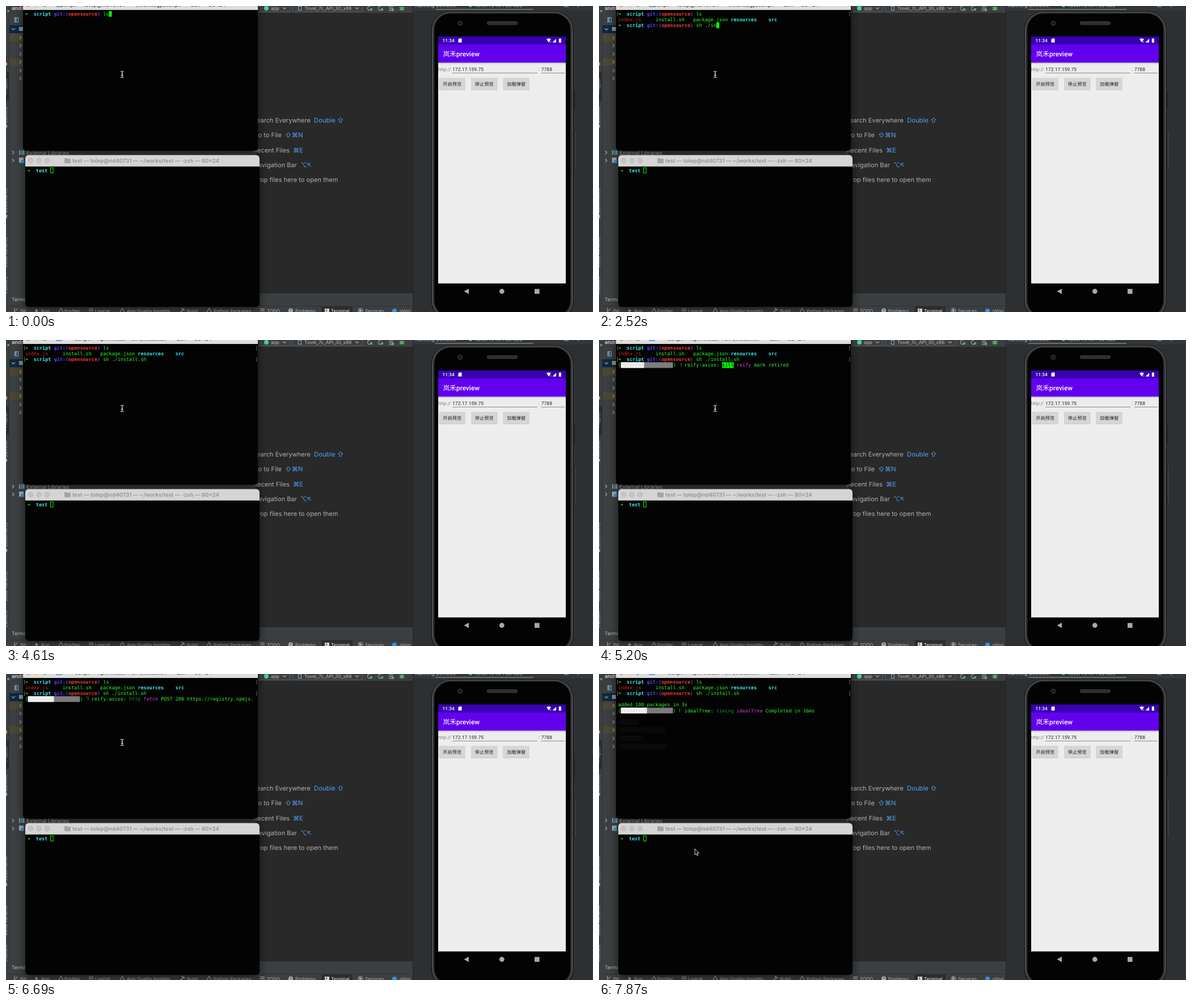
An HTML page with a canvas for the animation above (8000 ms loop, 1035 by 541 pixels).

```html
<!DOCTYPE html>
<html lang="en">
<head>
<meta charset="utf-8">
<title>Terminal install</title>
<style>
html, body { margin: 0; width: 100%; height: 100%; overflow: hidden; background: #2b2b2b; }
canvas { display: block; width: 1035px; height: 541px; }
</style>
</head>
<body>
<canvas id="stage" width="1035" height="541"></canvas>
<script>
const c = document.getElementById('stage').getContext('2d');
const LOOP = 8000;
const UI = 'Inter, "DejaVu Sans", sans-serif';
const PHONE = 'Roboto, "Noto Sans CJK SC", "Noto Sans CJK", sans-serif';
const MONO = '"DejaVu Sans Mono", monospace';
const CELL = 5.1, ROW = 10.1;
const GREEN = '#2cff22', LIME = '#00ff00', CYAN = '#3deaea', RED = '#f83a2e';
const BLUE = '#5a3cf5', MAGENTA = '#d040dc', DARK_GREEN = '#0c9a1a', SCREEN = '#030303';

// ---------- drawing helpers ----------
function box(x, y, w, h, color) {
  c.fillStyle = color;
  c.fillRect(x, y, w, h);
}
function round(x, y, w, h, r, color) {
  c.fillStyle = color;
  c.beginPath();
  c.roundRect(x, y, w, h, r);
  c.fill();
}
function dot(x, y, r, color) {
  c.fillStyle = color;
  c.beginPath();
  c.arc(x, y, r, 0, Math.PI * 2);
  c.fill();
}
function path(points, color, width = 1) {
  c.beginPath();
  points.forEach(([x, y]) => c.lineTo(x, y));
  c.strokeStyle = color;
  c.lineWidth = width;
  c.stroke();
}
function poly(points, color) {
  c.beginPath();
  points.forEach(([x, y]) => c.lineTo(x, y));
  c.closePath();
  c.fillStyle = color;
  c.fill();
}
function frame(x, y, w, h, color) {
  c.strokeStyle = color;
  c.lineWidth = 1;
  c.strokeRect(x, y, w, h);
}
function text(s, x, y, size, color, { font = UI, weight = 400, align = 'left' } = {}) {
  c.font = `${weight} ${size}px ${font}`;
  c.textAlign = align;
  c.fillStyle = color;
  c.fillText(s, x, y);
}
function chevron(x, y, down) {
  const p = down ? [[x - 3, y - 1.5], [x, y + 1.5], [x + 3, y - 1.5]]
                 : [[x - 1.5, y - 3], [x + 1.5, y], [x - 1.5, y + 3]];
  path(p, '#a5a8aa', 1.1);
}
// The last entry whose time has come.
const at = (list, t) => list.reduce((found, item) => item[0] <= t ? item : found, list[0]);

// ---------- IDE ----------
function sidebar() {
  box(0, 0, 447, 541, '#3c3f41');
  box(5, 0, 1, 530, '#323435');
  box(0, 117, 5, 51, '#2a2c2d');
  dot(4, 9, 2, '#59a869');
  text('andr', 10, 7, 9.2, '#c8cacb', { weight: 700 });
  frame(15.5, 20.5, 6, 8, '#9aa7b0');
  box(16, 21, 3, 8, '#3d8fc2');
  box(6, 34, 30, 14, '#0d293e');
  box(6, 49, 30, 14, '#4b4635');
  box(6, 92, 30, 14, '#4b4635');
  chevron(13, 41, true);
  box(23, 37, 9, 7, '#8f9aa3');
  [56, 70, 85, 99, 114, 128].forEach(y => chevron(25.5, y));
  chevron(12.5, 259);
  [23, 26, 29, 31].forEach((x, i) => box(x, 255, 1.6, 8, i % 2 ? '#4aa3c8' : '#9aa7b0'));
  text('External Libraries', 36, 262.5, 9.2, '#c4c7c9');
  chevron(12.5, 273);
  box(23, 268, 8, 9, '#9aa7b0');
  dot(29, 275, 3, '#3592c4');
  [['Project', 155], ['Commit', 208], ['Bookmarks', 366], ['Build Variants', 462], ['Structure', 514]]
    .forEach(([label, y]) => {
      c.save();
      c.translate(2, y);
      c.rotate(-Math.PI / 2);
      text(label, 0, 0, 8.2, '#b4b7b9');
      c.restore();
    });
  box(0, 100, 2, 5, '#9aa7b0');
  box(0, 210, 2, 5, '#9aa7b0');
  box(0, 369, 2, 6, '#9aa7b0');
}

function editor() {
  box(440, 0, 278, 12, '#3c3f41');
  box(440, 12, 278, 496, '#292929');
  frame(449.5, -8, 51, 18, '#5a5d5f');
  frame(505.5, -8, 123, 18, '#5a5d5f');
  dot(459, 4, 4, '#3ddc84');
  text('app', 467, 7, 8.4, '#bbbdbf');
  chevron(491, 4, true);
  frame(515.5, 0.5, 5, 7, '#9aa7b0');
  text('Tovel_7c_API_30_x86', 526, 7, 8.4, '#bbbdbf');
  chevron(619, 4, true);
  [641, 660].forEach(x => {
    c.beginPath();
    c.arc(x, 4, 3.5, 0.6, 5);
    c.strokeStyle = '#9aa7b0';
    c.lineWidth = 1.2;
    c.stroke();
    box(x + 1, 4, 4, 4, '#59a869');
  });
  [1, 4, 7].forEach(y => box(675, y, 8, 1.2, '#9aa7b0'));
  box(680, 5, 4, 4, '#59a869');
  dot(698, 4.5, 3.5, '#59a869');
  path([[693, 2], [703, 7]], '#59a869');
  path([[693, 7], [703, 2]], '#59a869');

  [['Search Everywhere', 537, 'Double ⇧', 543], ['Go to File', 486, '⇧⌘N', 492],
   ['Recent Files', 500, '⌘E', 506], ['Navigation Bar', 513, '⌥↖', 519],
   ['Drop files here to open them', 585.5, '', 0]]
    .forEach(([label, right, keys, x], i) => {
      const y = 206.3 + i * 26.15;
      text(label, right, y, 11.1, '#afb0b1', { align: 'right' });
      text(keys, x, y, 11.3, '#559ef5');
    });
}

function bottomBar() {
  box(0, 508, 718, 22, '#3c3f41');
  box(0, 530, 718, 1, '#2f3132');
  box(0, 531, 718, 10, '#3c3f41');
  text('Terminal', 10, 522, 8.8, '#b9bbbd');
  box(556, 531, 55, 10, '#2b2d2e');
  [['Git', 25, 17], ['Run', 62, 54], ['Profiler', 103, 97], ['Logcat', 157, 150],
   ['App Quality Insights', 213, 205], ['Build', 319, 311], ['Python Packages', 366, 358],
   ['TODO', 460, 452], ['Problems', 510, 502], ['Terminal', 573, 566], ['Services', 633, 625]]
    .forEach(([label, x, icon]) => {
      text(label, x, 541.5, 8.1, label === 'Terminal' ? '#f0f0f0' : '#b4b7b9');
      drawTabIcon(label, icon);
    });
  dot(685, 539, 4, '#3d8bf0');
  text('nVoo', 694, 541.5, 8.1, '#b4b7b9');
  box(717, 0, 1.5, 541, '#232425');
}
function drawTabIcon(label, x) {
  const gray = '#a4abb0';
  if (label === 'Problems') {
    dot(x, 538.5, 4, gray);
    box(x - 0.5, 536, 1.2, 3, '#3c3f41');
  } else if (label === 'Run' || label === 'Services') {
    if (label === 'Services') { c.beginPath(); c.arc(x, 538.5, 4, 0, 7); c.strokeStyle = gray; c.stroke(); }
    poly([[x - 2, 535], [x + 3, 538.5], [x - 2, 542]], gray);
  } else if (label === 'Logcat' || label === 'TODO') {
    [535, 538].forEach(y => box(x - 4, y, 8, 1.2, gray));
  } else if (label === 'Terminal') {
    box(x - 4, 535, 8, 6, '#d0d2d3');
    path([[x - 2, 536], [x, 538], [x - 2, 540]], '#2b2d2e');
  } else if (label === 'Git') {
    path([[x - 2, 534], [x - 2, 541]], gray);
    path([[x - 2, 540], [x + 2, 537], [x + 2, 535]], gray);
  } else if (label === 'Build') {
    path([[x - 3, 541], [x + 2, 536]], gray, 1.6);
    path([[x - 1, 534], [x + 4, 538]], gray, 2);
  } else {
    path([[x - 4, 541], [x, 534.5], [x + 4, 541]], gray, 1.2);
  }
}

// ---------- phone ----------
function phone() {
  box(718, 0, 317, 541, '#2d2f30');
  box(718, 0, 317, 8, '#34373a');
  text('Running Devices:', 721, 1.5, 9, '#b4b7b9');
  dot(819, -1, 3, '#3ddc84');
  text('Tovel 7c API 30 x86', 826, 1.5, 9, '#b4b7b9');
  box(757, 5, 173, 2, '#6a6e71');
  frame(984.5, -4, 7, 5, '#a4abb0');
  path([[1006, -1], [1010, 2]], '#a4abb0');
  box(1033.5, 8, 1.5, 533, '#38393a');

  round(1001, 150, 2.5, 33, 1, '#222425');
  round(1001, 220, 2.5, 71, 1, '#222425');
  box(1003, 222, 1, 67, '#4a4d4f');
  round(749.5, 9.5, 251.5, 545, 33, '#1a1b1c');
  round(751, 10.5, 248.5, 542, 32, '#505355');
  round(753, 12, 244.5, 539, 30, '#2a2b2c');
  round(755.5, 13.5, 239.5, 535, 28, '#030303');
  dot(801, 30.5, 4.5, '#2c2d2e');
  dot(801, 30.5, 2.2, '#111');
  round(848, 27, 54, 6.5, 3.2, '#353637');
  for (let x = 851; x < 900; x += 3) box(x, 28.5, 1, 3.5, '#1d1e1f');

  const L = 762, W = 225;
  box(L, 54, W, 436.5, '#ededed');
  box(L, 54, W, 14, '#3700b3');
  box(L, 68, W, 32, '#6200ee');
  const shade = c.createLinearGradient(0, 100, 0, 103);
  shade.addColorStop(0, 'rgba(0,0,0,.25)');
  shade.addColorStop(1, 'rgba(0,0,0,0)');
  box(L, 100, W, 3, shade);
  text('11:34', 769.5, 64.3, 8.4, '#fff', { font: PHONE, weight: 500 });
  poly([[799, 57.5], [803.5, 57.5], [803.5, 64.5], [797.5, 64.5], [797.5, 59]], '#fff');
  poly([[953, 58.5], [957, 57.3], [961, 58.5], [957, 64.5]], '#fff');
  text('x', 959, 64.5, 5, '#fff', { font: PHONE });
  poly([[963.5, 64.5], [970, 58], [970, 64.5]], '#fff');
  box(974.8, 58, 4, 6.8, '#fff');
  box(975.8, 57.2, 2, 1, '#fff');
  text('岚禾preview', 770.5, 88.7, 11.8, '#fff', { font: PHONE, weight: 500 });

  const field = { font: PHONE };
  text('http://', 761.8, 115, 8.3, '#808080', field);
  text('172.17.159.75', 787, 115, 8.6, '#252525', field);
  text(':', 939, 115, 8.3, '#606060', field);
  text('7788', 943.7, 115, 8.6, '#252525', field);
  box(787, 118, 150, 0.9, '#808080');
  box(943.5, 118, 41.5, 0.9, '#808080');
  [['开启预览', 763.5], ['停止预览', 820], ['加载弹窗', 876.5]].forEach(([label, x]) => {
    round(x, 127.5, 46.5, 21.2, 1, '#c6c6c6');
    round(x, 127, 46.5, 20.7, 1, '#d6d6d6');
    text(label, x + 23.2, 140.8, 8.2, '#1b1b1b', { font: PHONE, weight: 500, align: 'center' });
  });

  poly([[807.5, 504.5], [816, 499.8], [816, 509.2]], '#a9a9a9');
  dot(874.3, 504.5, 4.4, '#a9a9a9');
  box(932, 500.3, 8.6, 8.6, '#a9a9a9');
}

// ---------- terminals ----------
function cells(s, x, top, color, bold = false) {
  [...s].forEach((ch, i) => {
    if (ch !== ' ') text(ch, x + i * CELL, top + 8, 8.47, color, { font: MONO, weight: bold ? 700 : 400 });
  });
  return x + [...s].length * CELL;
}
const LEFT = 33.5;
const col = n => LEFT + n * CELL;
const rowTop = n => 9 + n * ROW;
const block = (n, row) => box(col(n), rowTop(row), CELL, 10, LIME);

function prompt(row, command, entered) {
  const y = rowTop(row);
  if (entered) {
    text('[', 30.2, y + 8, 8.4, '#808080', { font: MONO });
    text(']', 439.3, y + 8, 8.4, '#808080', { font: MONO });
  }
  cells('➜', col(0), y, GREEN, true);
  cells('script', col(3), y, CYAN, true);
  cells('git:(', col(10), y, BLUE, true);
  cells('opensource', col(15), y, RED, true);
  cells(')', col(25), y, BLUE, true);
  cells(command, col(27), y, GREEN);
}

function progress(row, [, filled, spinner, task, level, topic, rest]) {
  const y = rowTop(row);
  cells('(', col(0), y, GREEN);
  box(col(1), y, 18 * CELL, ROW, '#7c7c7c');
  box(col(1), y, filled * CELL, ROW, '#f2f2f2');
  cells('#'.repeat(filled), col(1), y, '#e2e2e2');
  cells(')', col(19), y, GREEN);
  cells(spinner, col(21), y, GREEN);
  let x = cells(task + ' ', col(23), y, GREEN);
  if (level === 'sill') box(x, y, 4 * CELL, ROW, LIME);
  x = cells(level, x, y, level === 'sill' ? '#000' : DARK_GREEN) + CELL;
  x = cells(topic, x, y, MAGENTA) + CELL;
  cells(rest, x, y, GREEN);
}

const typed = [
  [0, ''], [1340, 's'], [1490, 'sh'], [1630, 'sh '], [2080, 'sh .'],
  [2230, 'sh ./'], [2520, 'sh ./in'], [2670, 'sh ./install.sh']
];
const firstInstall = [
  [4760, 3, '⠋', 'idealTree:', 'sill', 'idealTree', 'buildDeps'],
  [4910, 4, '⠙', 'idealTree:ws:', 'sill', 'placeDep', 'ROOT ws@8.8.1 OK for: @1.0.0'],
  [5050, 6, '⠹', 'idealTree:', 'timing', 'idealTree', 'Completed in 91ms'],
  [5200, 8, '⠸', 'reify:axios:', 'sill', 'reify', 'mark retired'],
  [5350, 9, '⠼', 'reify:', 'timing', 'reify:loadTrees', 'Completed in 0ms'],
  [6250, 9, '⠙', 'reify:axios:', 'sill', 'audit', 'bulk request {'],
  [6550, 9, '⠹', 'reify:axios:', 'http', 'fetch', 'POST 200 https://registry.npmjs.']
];
const secondInstall = [
  [7720, 4, '⠋', 'idealTree:', 'sill', 'idealTree', 'buildDeps'],
  [7870, 9, '⠇', 'idealTree:', 'timing', 'idealTree', 'Completed in 16ms']
];
const titles = [
  [0, 'script — tolep@nd40731 — ~/works/gp/script — -zsh — 80×24'],
  [3120, 'script — sh ./install.sh — tolep@nd40731 — 80×24'],
  [3710, 'script — npm install ◂ sh ./install.sh — -zsh — 80×24']
];

function windowBody(x, y, w, h) {
  c.save();
  c.shadowColor = 'rgba(0,0,0,.6)';
  c.shadowBlur = 16;
  c.shadowOffsetY = 4;
  round(x, y, w, h, 6, SCREEN);
  c.restore();
}

function folder(x, y, color) {
  round(x, y - 4, 5, 3, 1, color);
  round(x, y - 3, 11, 8, 1, color);
}

function topTerminal(t) {
  windowBody(30, -15, 414, 271);
  box(30, 0, 414, 7, '#dedcdd');
  ['#fe5f57', '#febc2e', '#28c840'].forEach((color, i) => dot(39.5 + i * 14.4, -3.2, 4.6, color));
  folder(88, -3, '#5aa9dd');
  text(at(titles, t)[1], 242, 0.6, 9.5, '#4b4a4b', { weight: 600, align: 'center' });

  prompt(0, 'ls', t >= 140);
  if (t < 140) return block(29, 0);
  [['index.js', 0, '#d02a20'], ['install.sh', 13, GREEN], ['package.json', 26, GREEN],
   ['resources', 39, CYAN], ['src', 52, CYAN]]
    .forEach(([name, n, color]) => cells(name, col(n), rowTop(1), color, color === CYAN));
  if (t < 290) return block(0, 2);

  const command = at(typed, t)[1];
  prompt(2, command, t >= 2820);
  if (t < 2820) return block(27 + command.length, 2);
  if (t >= 3120 && t < 4610) block(0, 3);
  if (t >= 4760 && t < 6700) progress(3, at(firstInstall, t));
  if (t >= 6700) cells('added 100 packages in 3s', col(0), rowTop(4), GREEN);
  if (t >= 6840 && t < 7580) block(0, 5);
  if (t >= 7720) progress(5, at(secondInstall, t));
  if (t >= 7870) {
    [[85, 35], [99, 82], [114, 44], [128, 84]]
      .forEach(([y, w]) => round(35, y - 5, w, 10, 4, 'rgba(255,240,200,.025)'));
  }
}

function lowerTerminal() {
  windowBody(34, 263.6, 413, 268.4);
  round(34, 263.6, 413, 20.2, [6, 6, 0, 0], '#d6d4d5');
  [43.5, 58, 72.3].forEach(x => {
    dot(x, 273.4, 4.8, '#b5b3b4');
    dot(x, 273.4, 4.1, '#c5c3c4');
  });
  folder(103, 273, '#a5a3a4');
  text('test — tolep@nd40731 — ~/works/test — -zsh — 80×24', 246.5, 276.8, 9.55, '#939192',
    { weight: 600, align: 'center' });
  cells('➜', 37.5, 285.5, GREEN, true);
  cells('test', 37.5 + 3 * CELL, 285.5, CYAN, true);
  frame(78.5, 286, 4.6, 9.2, LIME);
}

function pointer(t) {
  if (t >= 7870) {
    const arrow = [[169, 309], [169, 319.5], [171.4, 317.4], [173, 321], [174.8, 320.2],
                   [173.2, 316.7], [176.3, 316.5]];
    poly(arrow, '#000');
    path([...arrow, arrow[0]], '#f2f2f2', 0.9);
    return;
  }
  const ink = '#f0f0f0';
  path([[202, 115.5], [204, 115.5], [204.8, 116.5], [205.6, 115.5], [207.6, 115.5]], ink);
  path([[204.8, 116], [204.8, 126]], ink, 1.3);
  path([[202, 126.5], [204, 126.5], [204.8, 125.5], [205.6, 126.5], [207.6, 126.5]], ink);
  path([[203, 122.5], [206.6, 122.5]], ink);
}

function render(now) {
  const t = now % LOOP;
  c.textRendering = 'geometricPrecision';
  sidebar();
  editor();
  bottomBar();
  phone();
  topTerminal(t);
  lowerTerminal();
  pointer(t);
}

let start;
function tick(now) {
  start ??= now;
  render(now - start);
  requestAnimationFrame(tick);
}
requestAnimationFrame(tick);
</script>
</body>
</html>
```
